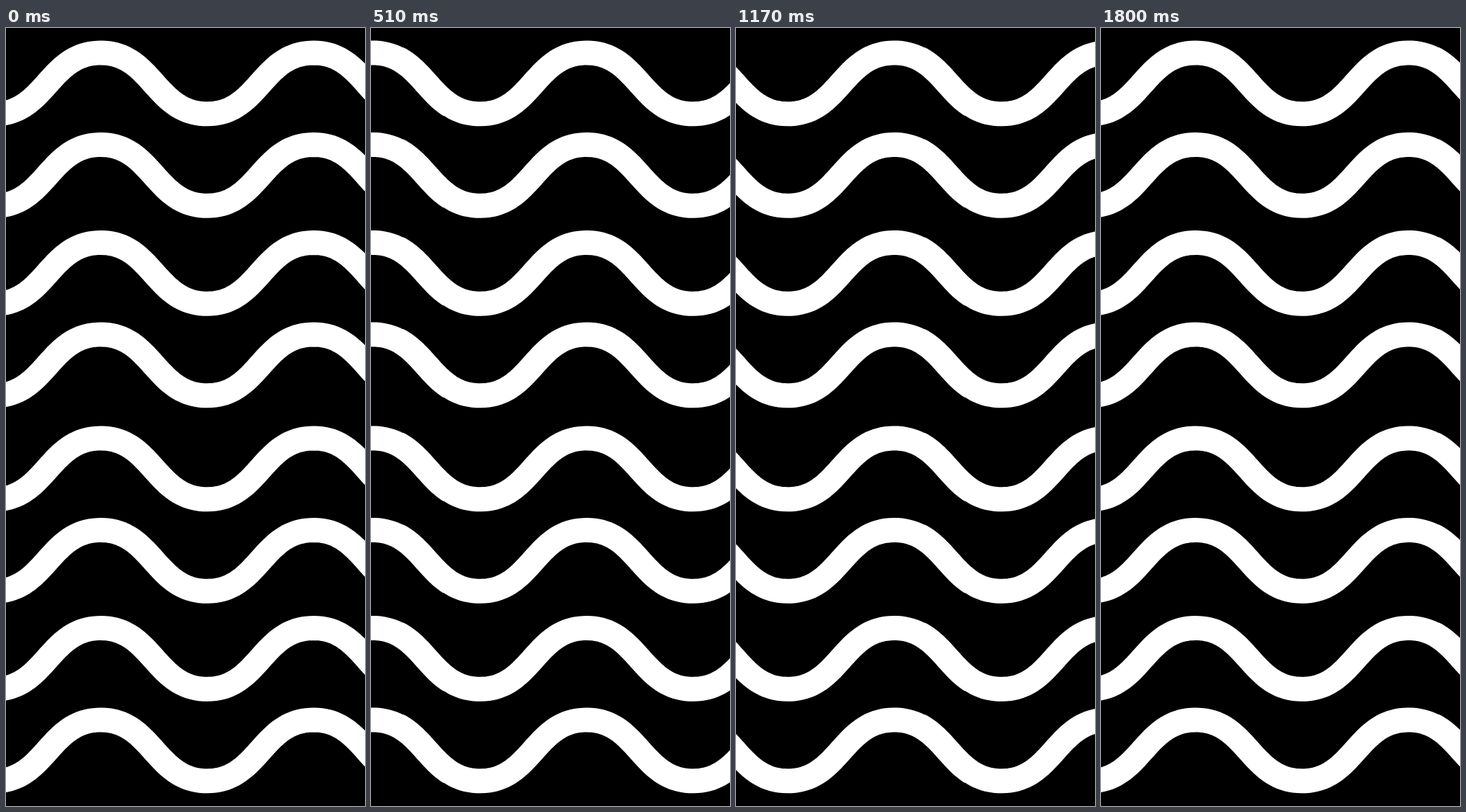
Write an HTML page with a canvas that moves like this. It is 499 px wide and 1080 px high and loops after 1.83 s.

```html
<!DOCTYPE html>
<html lang="en">
<head>
<meta charset="utf-8">
<title>Waves</title>
<style>
  html, body { margin: 0; width: 100%; height: 100%; overflow: hidden; background: #000; }
  canvas { display: block; }
</style>
</head>
<body>
<canvas width="499" height="1080"></canvas>
<script>
const ctx = document.querySelector('canvas').getContext('2d');

const LOOP = 1830, STEP = 30;
const HALF = 148;      // peak to trough, horizontally
const HEIGHT = 84.8;   // peak to trough, vertically
const HANDLE = 72;     // horizontal Bézier handle at peaks and troughs
const TRAVEL = 593;    // two wavelengths plus the 1px seam
const SAMPLES = 40;    // per half wave
const ROWS = [0, 127.5, 263.5, 391, 535, 662.5, 798.5, 926];

// Point on the wave; integers are peaks (even) and troughs (odd).
function wavePoint(v) {
  const k = Math.floor(v), u = v - k, w = 1 - u;
  const x = 3 * u * w * w * HANDLE + 3 * u * u * w * (HALF - HANDLE) + u * u * u * HALF;
  const ease = u * u * (3 - 2 * u);
  return [k * HALF + x, HEIGHT * (k % 2 ? 1 - ease : ease)];
}

function wavePath(from, to, shift) {
  const path = new Path2D();
  const count = Math.ceil((to - from) * SAMPLES);
  for (let i = 0; i <= count; i++) {
    const [x, y] = wavePoint(from + (to - from) * i / count);
    path.lineTo(x + shift, y);
  }
  return path;
}

// Two strips overlap on a falling slope, one pixel out of step.
const strips = [wavePath(-6, 0.77, 0), wavePath(0.18, 7, 1)];

function draw(now) {
  const time = Math.floor(now % LOOP / STEP) * STEP;
  const x = -165.5 + TRAVEL * time / (LOOP - STEP);
  ctx.setTransform(1, 0, 0, 1, 0, 0);
  ctx.fillStyle = '#000';
  ctx.fillRect(0, 0, 499, 1080);
  ctx.strokeStyle = '#fff';
  ctx.lineWidth = 34;
  for (const row of ROWS) {
    ctx.setTransform(1, 0, 0, 1, x, 34.5 + row);
    strips.forEach(strip => ctx.stroke(strip));
  }
}

const start = performance.now();
function tick() {
  draw(performance.now() - start);
  requestAnimationFrame(tick);
}
tick();
</script>
</body>
</html>
```
